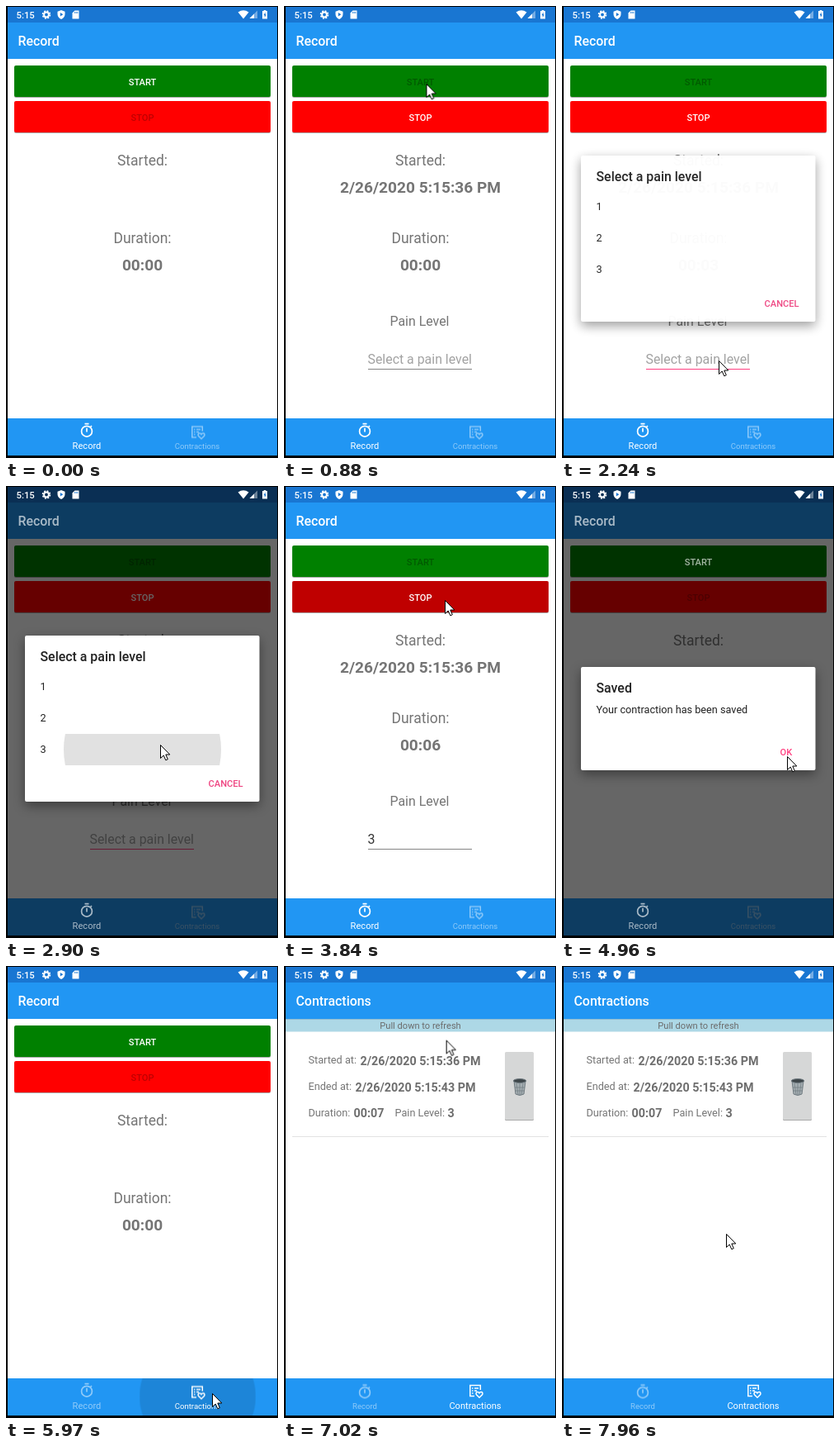
These frames come from a looping animation (330 by 547 pixels, 8000 ms). An HTML page:

```html
<!DOCTYPE html>
<html lang="en">
<head>
<meta charset="utf-8">
<title>Contraction timer</title>
<style>
html, body { margin: 0; width: 100%; height: 100%; overflow: hidden; background: #000; }
svg { display: block; width: 330px; height: 547px; font-family: Roboto, sans-serif; }

.mid { text-anchor: middle; }
.title { font-size: 15.9px; font-weight: 500; }
.btn { font-size: 11.1px; font-weight: 500; }
.head { font-size: 17.5px; fill: #757575; }
.big { font-size: 19.1px; font-weight: 700; fill: #757575; }
.field { font-size: 15.9px; fill: #757575; }
.body { font-size: 12.7px; }
.value { font-size: 14.3px; font-weight: 700; fill: #6e6e6e; }
.raised { filter: drop-shadow(0 1px .7px #0005); }
.dialog { filter: drop-shadow(0 5px 7px #0006); }
.line { fill: none; stroke: #fff; }

/* One loop is 8 s, so 1% is 80 ms. */
.run, .idle, .empty, .chosen, .focus, .seconds, .record, .list,
.tab-a, .tab-b, .label-a, .label-b, .icon-a, .icon-b, .item-tap {
  animation: 8s step-end infinite;
}
.run { animation-name: run; }
.idle { animation-name: idle; }
.empty { animation-name: empty; }
.chosen { animation-name: chosen; }
.focus { animation-name: focus; }
.seconds { animation-name: seconds; }
.record { animation-name: record; }
.list { animation-name: list; }
.tab-a { animation-name: tab-a; }
.tab-b { animation-name: tab-b; }
.label-a { animation-name: label-a; }
.label-b { animation-name: label-b; }
.icon-a { animation-name: icon-a; }
.icon-b { animation-name: icon-b; }
.item-tap { animation-name: item-tap; }
@keyframes run { 0%, 52.25% { opacity: 0; } 10% { opacity: 1; } }
@keyframes idle { 0%, 52.25% { opacity: 1; } 10% { opacity: 0; } }
@keyframes empty { 0% { opacity: 1; } 40.6% { opacity: 0; } }
@keyframes chosen { 0% { opacity: 0; } 40.6% { opacity: 1; } }
@keyframes focus { 0%, 40.6% { stroke: #858585; } 26.25% { stroke: #ff4081; } }
@keyframes seconds {
  0%, 52.25% { transform: none; }
  18.5% { transform: translateY(-30px); }
  27% { transform: translateY(-60px); }
  38.6% { transform: translateY(-90px); }
  46.25% { transform: translateY(-120px); }
}
@keyframes record { 0% { opacity: 1; } 81.5% { opacity: 0; } }
@keyframes list { 0% { opacity: 0; } 81.5% { opacity: 1; } }
@keyframes tab-a { 0% { opacity: 1; } 74.4% { opacity: .5; } }
@keyframes tab-b { 0% { opacity: .5; } 74.4% { opacity: 1; } }
@keyframes label-a { 0% { font-size: 11.1px; } 81.5% { font-size: 9.55px; } }
@keyframes label-b { 0% { font-size: 9.55px; } 81.5% { font-size: 11.1px; } }
@keyframes icon-a { 0% { transform: none; } 81.5% { transform: translateY(1.5px); } }
@keyframes icon-b { 0% { transform: translateY(1.5px); } 81.5% { transform: none; } }
@keyframes item-tap { 0% { opacity: 0; } 36.25% { opacity: .12; } }

.start-tap { animation: start-tap 8s linear infinite; }
.stop-tap { animation: stop-tap 8s linear infinite; }
.tab-tap { animation: tab-tap 8s linear infinite; }
.dim { animation: dim 8s linear infinite; }
.lit { animation: lit 8s linear infinite; }
.picker { animation: picker 8s linear infinite; }
.saved { animation: saved 8s linear infinite; }
.spinner { animation: spinner 8s ease-in-out infinite; }
.arc { animation: arc 8s linear infinite; }
.cursor { animation: cursor 8s ease-in-out infinite; }
@keyframes start-tap {
  0%, 7.37% { opacity: 0; } 7.375%, 9.625% { opacity: .25; } 11%, 100% { opacity: 0; }
}
@keyframes stop-tap {
  0%, 46.2% { opacity: 0; } 46.25% { opacity: .12; } 47.5%, 52.25% { opacity: .25; } 53.1%, 100% { opacity: 0; }
}
@keyframes tab-tap {
  0%, 73.9% { opacity: 0; transform: scale(.3); }
  74% { opacity: .11; transform: scale(.4); }
  74.6%, 81.5% { opacity: .11; transform: none; }
  81.7%, 100% { opacity: 0; transform: none; }
}
@keyframes dim {
  0%, 28.75%, 41%, 56%, 70%, 100% { opacity: 0; }
  30.5%, 38.6%, 57.5%, 68.1% { opacity: .6; }
}
@keyframes lit {
  0%, 28.75%, 41%, 56%, 70%, 100% { opacity: 1; }
  30.5%, 38.6%, 57.5%, 68.1% { opacity: .65; }
}
@keyframes picker {
  0%, 27% { opacity: 0; } 28%, 28.75% { opacity: .97; }
  29.5%, 38.6% { opacity: 1; } 40.5%, 100% { opacity: 0; }
}
@keyframes saved {
  0%, 56% { opacity: 0; } 57.25%, 68.1% { opacity: 1; } 69.7%, 100% { opacity: 0; }
}
@keyframes spinner {
  0%, 88.75% { transform: translateY(62px); opacity: .3; }
  93.1%, 95.1% { transform: translateY(160px); opacity: 1; }
  97.4% { transform: translateY(115px); opacity: 1; }
  99.4%, 100% { transform: translateY(115px) scale(0); opacity: 0; }
}
@keyframes arc { 0%, 88.75% { transform: none; } 93.1%, 95.1% { transform: rotate(270deg); } 100% { transform: rotate(450deg); } }
@keyframes cursor {
  0%, 1.6% { opacity: 0; transform: translate(253px, 441px); }
  1.625% { opacity: 1; transform: translate(253px, 441px); }
  5% { transform: translate(160px, 80px); }
  9.625% { transform: translate(160px, 80px); animation-timing-function: ease-in; }
  11% { transform: translate(172px, 93px); animation-timing-function: ease-out; }
  14%, 16% { transform: translate(225px, 242px); }
  21.1%, 28.75% { transform: translate(190px, 429px); }
  32.5%, 39.4% { transform: translate(187px, 313px); }
  44.4%, 57.5% { transform: translate(195px, 138px); }
  62%, 68.75% { transform: translate(273px, 327px); }
  73.75%, 83.5% { transform: translate(250px, 517px); }
  88.1%, 88.75% { transform: translate(196px, 85px); }
  93.1%, 100% { opacity: 1; transform: translate(199px, 324px); }
}
</style>
</head>
<body>
<svg viewBox="0 0 330 547">
  <defs>
    <clipPath id="screen"><path d="M2 1H329V544H2Z"/></clipPath>
    <clipPath id="nav"><path d="M2 499H329V544H2Z"/></clipPath>
    <clipPath id="clock"><path d="M130 303H200V326H130Z"/></clipPath>
    <clipPath id="row"><path d="M23 300H307V338H23Z"/></clipPath>
    <clipPath id="below"><path d="M2 80H329V499H2Z"/></clipPath>
  </defs>
  <rect width="330" height="547"/>

  <g clip-path="url(#screen)">
    <rect width="330" height="547" fill="#fff"/>
    <rect width="330" height="64" fill="#2196f3"/>
    <rect width="330" height="20" fill="#1976d2"/>

    <g class="record">
      <g class="raised">
        <rect x="10" y="72" width="311" height="38" rx="2" fill="#008000"/>
        <rect x="10" y="115" width="311" height="38" rx="2" fill="#f00"/>
      </g>
      <rect class="start-tap" x="10" y="72" width="311" height="38" rx="2"/>
      <rect class="stop-tap" x="10" y="115" width="311" height="38" rx="2"/>
      <text class="btn mid idle" x="165.5" y="139" fill-opacity=".26">STOP</text>
      <text class="head mid" x="165.5" y="193">Started:</text>
      <text class="head mid" x="165.5" y="287">Duration:</text>
      <g clip-path="url(#clock)">
        <g class="seconds big mid">
          <text x="165.5" y="320">00:00</text>
          <text x="165.5" y="350">00:01</text>
          <text x="165.5" y="380">00:03</text>
          <text x="165.5" y="410">00:05</text>
          <text x="165.5" y="440">00:06</text>
        </g>
      </g>
      <g class="run">
        <text class="btn mid" x="165.5" y="95.5" fill-opacity=".3">START</text>
        <text class="btn mid" x="165.5" y="139" fill="#fff">STOP</text>
        <text class="big mid" x="165.5" y="226">2/26/2020 5:15:36 PM</text>
        <text class="field mid" x="164.5" y="387">Pain Level</text>
        <text class="field empty" x="101.5" y="432.5" style="fill:#a2a2a2">Select a pain level</text>
        <text class="field chosen" x="101.5" y="432.5" style="fill:#333">3</text>
        <path class="focus" d="M102 439.5H228"/>
      </g>
    </g>

    <g class="list">
      <rect y="64" width="330" height="15.5" fill="#add8e6"/>
      <path d="M0 64.5H330" stroke="#7aa9c4" stroke-opacity=".6"/>
      <text class="mid" x="165.5" y="76" font-size="11.1" fill="#6c6c6c">Pull down to refresh</text>
      <g class="body" fill="#757575">
        <text x="29.5" y="118">Started at:</text>
        <text x="29.5" y="150">Ended at:</text>
        <text x="29.5" y="182">Duration:</text>
        <text x="134.5" y="182">Pain Level:</text>
      </g>
      <g class="value">
        <text x="92.5" y="119.5">2/26/2020 5:15:36 PM</text>
        <text x="86.5" y="151.5">2/26/2020 5:15:43 PM</text>
        <text x="84.5" y="183">00:07</text>
        <text x="198.5" y="183">3</text>
      </g>
      <rect class="raised" x="268" y="104" width="35" height="82" rx="1.5" fill="#d6d7d7"/>
      <g stroke="#6f7a80">
        <path d="M279 139L281 155Q286 158 291 155L293 139Z" fill="#a5aeb2"/>
        <path d="M282 142L284 156M286 142V156M290 142L288 156M280 147H292M281 151H291" stroke-width=".7"/>
        <ellipse cx="286" cy="139" rx="7.7" ry="2.4" fill="#3d4549"/>
      </g>
      <path d="M10 206.5H321" stroke="#e2e2e2"/>
    </g>

    <rect y="499" width="330" height="46" fill="#2196f3"/>
    <g clip-path="url(#nav)"><g transform="translate(232.5 521)"><circle class="tab-tap" r="70.5"/></g></g>
    <g class="tab-b">
      <g class="icon-b line" stroke-width="1.5">
        <path d="M231 520.5H225.8V507.5H238.3V513"/>
        <path d="M228 511H229.5M231 511H236M228 514H229.5M231 514H234M228 517H229.5"/>
        <path d="M237 522.3L233.5 518.8Q232.3 516.5 234.3 515.5Q236 515 237 516.8Q238 515 239.7 515.5Q241.7 516.5 240.5 518.8Z"/>
      </g>
      <text class="label-b mid" x="232" y="536" fill="#fff">Contractions</text>
    </g>

    <rect class="dim" width="330" height="547"/>

    <g class="lit" fill="#fff">
      <text class="title record" x="14.5" y="48">Record</text>
      <text class="title list" x="14.5" y="48">Contractions</text>
      <g class="record"><text class="btn mid idle" x="165.5" y="95.5">START</text></g>
      <g class="tab-a">
        <g class="icon-a line" stroke-width="1.7">
          <circle cx="98" cy="514.7" r="6.4"/>
          <path d="M95.5 505.6H100.5M98 510.8V515.5M102.5 509.5L104 508"/>
        </g>
        <text class="label-a mid" x="98" y="536">Record</text>
      </g>
    </g>

    <g fill="#fff">
      <text x="12.5" y="14.5" font-size="11.3" font-weight="500">5:15</text>
      <g class="line">
        <circle cx="49" cy="10.5" r="2.9" stroke-width="2"/>
        <circle cx="49" cy="10.5" r="4.5" stroke-width="1.6" stroke-dasharray="2 1.53"/>
      </g>
      <path d="M67 5L71.5 6.8V10Q71.3 14 67 16Q62.7 14 62.5 10V6.8Z"/>
      <path d="M65.8 8L69.3 10.3L65.8 12.6Z" fill="#1976d2"/>
      <path d="M83.5 5.5H88.5V15.5H80.5V8.5Z"/>
      <path d="M83.6 7V9M85.2 7V9M86.8 7V9" stroke="#1976d2" stroke-width=".8"/>
      <path d="M281.5 7.5Q288 2.8 294.5 7.5L288 15.5Z"/>
      <path d="M305 5.5V15H295.5Z" opacity=".4"/>
      <path d="M301 9.5V15H295.5Z"/>
      <path d="M312.7 5H315.3V6H317V15.5H311V6H312.7Z"/>
      <path d="M314.6 7.5L312.5 11.3H313.8V14L315.7 10.2H314.6Z" fill="#1976d2"/>
    </g>

    <g class="picker">
      <rect class="dialog" x="23" y="181" width="284.5" height="201" rx="2" fill="#fff"/>
      <g clip-path="url(#row)"><circle class="item-tap" cx="165.5" cy="319" r="95.5"/></g>
      <g fill="#212121">
        <text class="title" x="41.5" y="212">Select a pain level</text>
        <g class="body">
          <text x="41.5" y="247">1</text>
          <text x="41.5" y="285">2</text>
          <text x="41.5" y="323">3</text>
        </g>
      </g>
      <text class="btn" x="245.5" y="364" fill="#ee4380">CANCEL</text>
    </g>

    <g class="saved">
      <rect class="dialog" x="23" y="219" width="284.5" height="125" rx="2" fill="#fff"/>
      <g fill="#212121">
        <text class="title" x="41.5" y="250">Saved</text>
        <text class="body" x="41.5" y="275">Your contraction has been saved</text>
      </g>
      <text class="btn" x="264.5" y="326" fill="#ff4081">OK</text>
    </g>

    <g clip-path="url(#below)">
      <g transform="translate(165.5 0)">
        <g class="spinner">
          <circle class="raised" r="15.5" fill="#fafafa"/>
          <path class="arc" d="M0 -6A6 6 0 1 1 -6 0" fill="none" stroke="#222" stroke-width="2"/>
        </g>
      </g>
    </g>

    <path class="cursor" d="M.5 .5V16.5L4.2 13L6.8 18.8L9.3 17.7L6.8 12H11.8Z" fill="#fff" stroke="#000"/>
  </g>
</svg>
</body>
</html>
```
